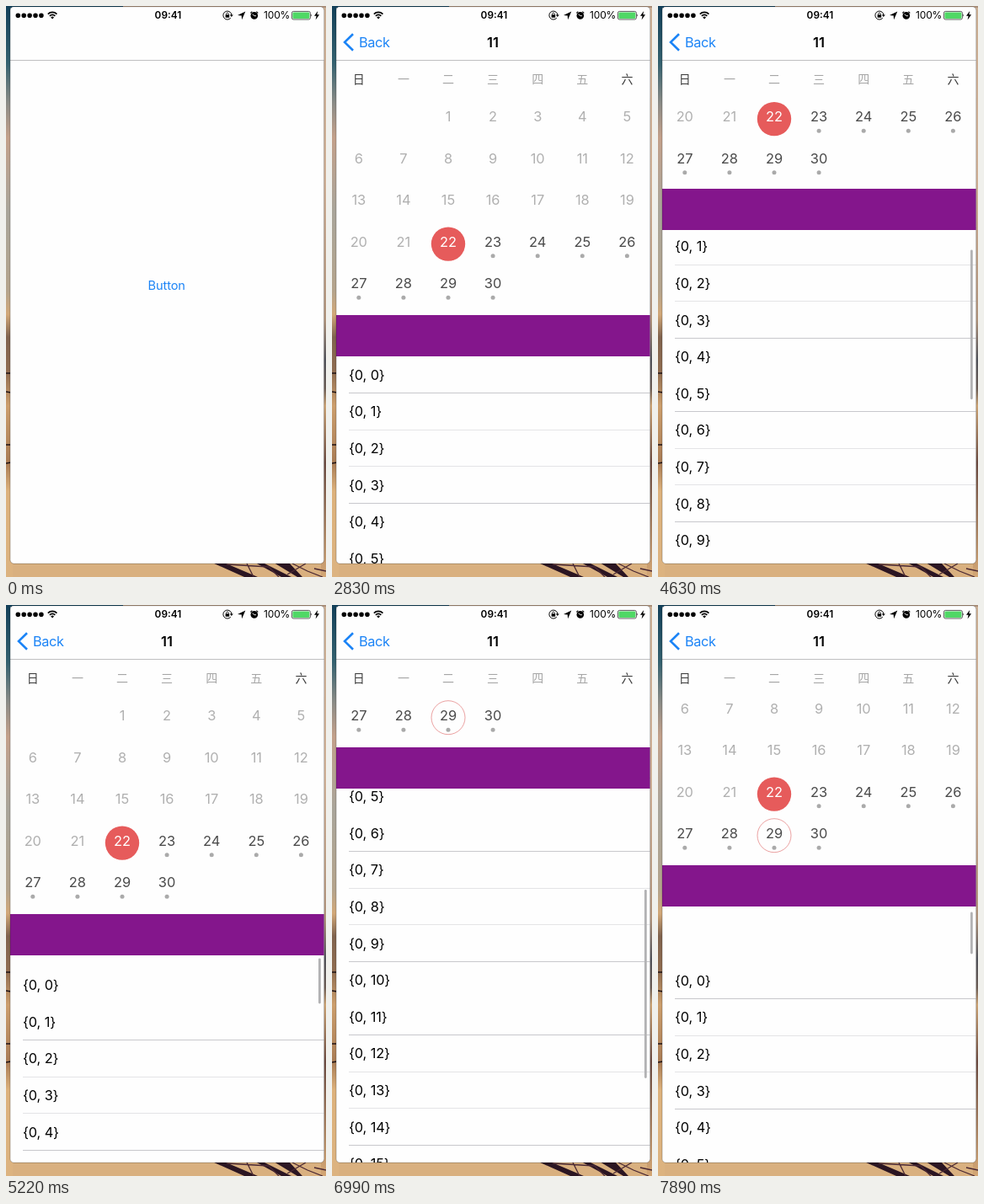
Animation of 380x678 px, one loop 8 s. Source, as an HTML page:

```html
<!DOCTYPE html>
<html lang="en">
<head>
<meta charset="utf-8">
<title>Calendar list</title>
<style>
  html, body { margin: 0; width: 100%; height: 100%; overflow: hidden; background: #d9b07f; }
  svg { display: block; width: 100vw; height: 100vh; }
  text { font-family: Inter, "Liberation Sans", sans-serif; }
  .cjk { font: 300 14px "Noto Sans CJK SC", "Noto Sans CJK", "Noto Sans CJK JP", sans-serif; }
  .mid { text-anchor: middle; }
  .day { font-size: 16.4px; }
  .cell { font-size: 16.3px; letter-spacing: -.1px; }
  .blue { fill: #1c84f6; }
</style>
</head>
<body>
<svg viewBox="0 0 380 678" xmlns="http://www.w3.org/2000/svg">
  <defs>
    <linearGradient id="sky" x2="0" y2="1">
      <stop offset="0" stop-color="#123f58"/>
      <stop offset=".1" stop-color="#34616f"/>
      <stop offset=".17" stop-color="#8a8b86"/>
      <stop offset=".23" stop-color="#c3a08a"/>
      <stop offset=".36" stop-color="#a9a59a"/>
      <stop offset=".5" stop-color="#b5a48c"/>
      <stop offset=".54" stop-color="#d2a878"/>
      <stop offset=".58" stop-color="#80634e"/>
      <stop offset=".64" stop-color="#8f6c50"/>
      <stop offset=".7" stop-color="#cc9e6c"/>
      <stop offset=".8" stop-color="#a97c55"/>
      <stop offset=".85" stop-color="#ddb27c"/>
      <stop offset="1" stop-color="#dcb380"/>
    </linearGradient>
    <linearGradient id="side" x2="0" y2="1">
      <stop offset="0" stop-color="#cbae93"/>
      <stop offset=".3" stop-color="#d0b096"/>
      <stop offset=".55" stop-color="#b0937b"/>
      <stop offset=".62" stop-color="#50525a"/>
      <stop offset=".67" stop-color="#6c5d55"/>
      <stop offset=".7" stop-color="#cda373"/>
      <stop offset=".8" stop-color="#6b4a40"/>
      <stop offset="1" stop-color="#d4a775"/>
    </linearGradient>
    <clipPath id="screen"><rect x="5" y="1" width="372.6" height="661" rx="4.5"/></clipPath>
  </defs>

  <g id="wall">
    <rect width="380" height="678" fill="#d9b07f"/>
    <rect width="8" height="678" fill="url(#sky)"/>
    <rect x="374" width="6" height="678" fill="url(#side)"/>
    <path d="M0 0H139V2H0z" fill="#123f58"/>
    <path d="M139 0H380V2H139z" fill="#a98e78"/>
    <path d="M0 436H6M0 521H6M0 458l6 1M0 543l6-1" stroke="#1d1214" stroke-width="1.6"/>
    <path d="M245 661h14l40 17h-16zM296 661h9l34 17h-12zM318 661h18l16 17h-6z" fill="#2b1522"/>
    <path d="M262 663l50 3 12 12M286 662l8 16M340 662l18 9 18 7M356 662l-22 13M366 668l14 3" fill="none" stroke="#4a2833" stroke-width="1.3"/>
  </g>

  <g clip-path="url(#screen)">
    <rect x="5" width="373" height="662" fill="#fefefe"/>
    <text id="button" class="mid blue" x="190.7" y="337" font-size="14.6" letter-spacing="-.1">Button</text>
    <rect id="dim" x="5" y="65" width="373" height="597"/>
    <g id="page">
      <rect x="5" y="65" width="373" height="597" fill="#fefefe"/>
      <g id="list"></g>
      <rect id="bar" x="371" width="2.8" rx="1.4" fill="#b2b2b4"/>
      <rect id="sheet" x="5" y="-150" width="373" height="517" fill="#fefefe"/>
      <g id="days"></g>
      <rect id="band" x="5" y="367" width="373" height="49" fill="#84168c"/>
      <rect x="5" y="60" width="373" height="49" fill="#fefefe"/>
      <g id="week"></g>
    </g>

    <rect x="5" width="373" height="64" fill="#fefefe"/>
    <rect x="5" y="64" width="373" height="1" fill="#bfbfc1"/>
    <text id="title" class="mid" y="48.6" font-size="16.4" font-weight="600">11</text>
    <g id="back">
      <path d="M25 33.3L15 43l10 9.7" fill="none" stroke="#1c84f6" stroke-width="2.6"/>
      <text class="blue" x="32" y="48.7" font-size="16.3" letter-spacing="-.35">Back</text>
    </g>

    <g id="status">
      <path d="M14.3 11.2h0M21.2 11.2h0M28.1 11.2h0M35 11.2h0M41.9 11.2h0" stroke="#000" stroke-width="5.6" stroke-linecap="round"/>
      <path d="M49.8 9.6a7.4 7.4 0 0 1 10.6 0M51.9 11.8a4.5 4.5 0 0 1 6.4 0" fill="none" stroke="#000" stroke-width="1.7"/>
      <path d="M55.1 15.4l-1.9-2a2.7 2.7 0 0 1 3.8 0z"/>
      <text class="mid" x="192.4" y="15.3" font-size="11.8" font-weight="600">09:41</text>
      <path d="M266.8 14.2a5 5 0 1 1 1.1-3.1" fill="none" stroke="#000"/>
      <path d="M265.8 10.6h4l-2 2.5zM260.6 10.3h4.6v3.5h-4.6z"/>
      <path d="M261.5 10.5v-1a1.4 1.4 0 0 1 2.8 0v1" fill="none" stroke="#000" stroke-width=".8"/>
      <path d="M284.3 6.6L275 11l4.7.5.4 4.8z"/>
      <circle cx="294.8" cy="11.4" r="4.3"/>
      <path d="M290.3 8.4l2-1.8M299.3 8.4l-2-1.8" stroke="#000" stroke-width="1.2"/>
      <path d="M292.6 9.7l2.3 2h2.2" fill="none" stroke="#fff" stroke-width=".9"/>
      <text x="306" y="15.3" font-size="12" letter-spacing="-.15">100%</text>
      <rect x="339.4" y="6.4" width="22" height="9.6" rx="2" fill="#fefefe" stroke="#333" stroke-width=".8"/>
      <rect x="340.4" y="7.4" width="20" height="7.6" rx="1.2" fill="#4fd865"/>
      <path d="M362.3 9.6q1.6 1.6 0 3.2z"/>
      <path d="M370.2 6l-4.2 5.8h2.6l-1 4.6 4.5-6.2h-2.7z"/>
    </g>
  </g>
  <rect x="5" y=".8" width="372.7" height="661.4" rx="4.5" fill="none" stroke="#000" stroke-opacity=".3" stroke-width=".8"/>
</svg>

<script>
const LOOP = 8000, TICK = 148.75, FIRST = 1926;
const ROW = 43.6, ROWS = 20, WEEK = 49.5, BOTTOM = 662;

// [tick, value] pairs
const listTop = [[8, 416], [9, 408], [10, 340], [11, 235], [12, 115], [13, 11.7], [14, -60], [15, -90],
  [16, -60], [17, 60], [18, 220], [19, 340], [20, 400], [21, 436], [22, 429.4], [23, 419], [24, 416],
  [29, 416], [30, 408], [31, 330], [32, 180], [33, 60], [34, -12.6], [35, -40], [36, -50],
  [37, 0], [38, 150], [39, 330], [40, 424]];
const fold = [[8, 0], [9, 6], [12, 115], [13, 146], [14, 198], [17, 198], [18, 150], [19, 70], [20, 15], [21, 0],
  [29, 0], [30, 6], [31, 55], [32, 120], [33, 175], [34, 198], [38, 198], [39, 130], [40, 58]];
const barFade = [[8, 0], [9, 1], [23, 1], [26, 0], [29, 0], [30, 1]];
const ring = [[24, 0], [26, 1]];

const $ = id => document.getElementById(id);
const set = (el, attrs) => { for (const k in attrs) el.setAttribute(k, attrs[k]); return el; };
const clamp = v => Math.max(0, Math.min(1, v));
const move = (id, x, y) => set($(id), { transform: `translate(${x} ${y})` });

function add(parent, tag, attrs, text) {
  const el = document.createElementNS('http://www.w3.org/2000/svg', tag);
  if (text !== undefined) el.textContent = text;
  return parent.appendChild(set(el, attrs));
}

function track(keys, k) {
  const i = keys.findIndex(key => key[0] > k);
  if (i < 0) return keys[keys.length - 1][1];
  if (i === 0) return keys[0][1];
  const [a, va] = keys[i - 1], [b, vb] = keys[i];
  return va + (vb - va) * (k - a) / (b - a);
}

const colX = c => 31.8 + 53.1 * c;

[...'日一二三四五六'].forEach((s, c) =>
  add($('week'), 'text', { class: 'cjk mid', x: colX(c), y: 92, fill: c % 6 ? '#a6a6a6' : '#3c3c3c' }, s));

let pick;
for (let d = 1; d <= 30; d++) {
  const c = (d + 1) % 7, r = Math.floor((d + 1) / 7);
  const x = colX(c), y = 131.3 + WEEK * r, days = $('days');
  if (d === 22) add(days, 'circle', { cx: x, cy: y + 2.8, r: 20.2, fill: '#e65b5b' });
  if (d === 29) pick = add(days, 'circle', { cx: x, cy: y + 2.4, r: 20, fill: 'none', stroke: '#dd6262', 'stroke-width': .6 });
  const fill = d < 22 ? '#b0b0b0' : d === 22 ? '#fff' : '#4a4a4a';
  add(days, 'text', { class: 'day mid', x, y: y + 6, fill }, d);
  if (d > 22) add(days, 'circle', { cx: x, cy: y + 17, r: 2.5, fill: '#aaa' });
}

const cells = Array.from({ length: ROWS }, (_, i) => ({
  label: add($('list'), 'text', { class: 'cell', x: 20 }, `{0, ${i}}`),
  line: add($('list'), 'rect', { x: 20, width: 358, height: 1, fill: '#c4c4c8' })
}));

function drawList(top, head) {
  cells.forEach(({ label, line }, i) => {
    const y = top + ROW * i, end = y + ROW, phase = end - Math.floor(end);
    set(label, { y: y + 27.8 });
    // hairlines fade as they fall between pixels
    set(line, { y: Math.floor(end), opacity: clamp(1.15 - 2.3 * Math.abs(phase - .5)) });
  });
  const h = BOTTOM - head, off = head - top, total = ROW * ROWS;
  const over = Math.max(0, -off);
  set($('bar'), {
    y: head + 2.5 + Math.max(0, off) / total * h + Math.min(4, over / 15),
    height: Math.max(50, h * h / total - over - 2)
  });
}

function render(t) {
  const k = Math.floor((t - FIRST) / TICK);
  const p = 1 - (1 - clamp((k - .8) / 3.2)) ** 3;
  const s = Math.round(track(fold, k));

  set($('button'), { opacity: k < 0 ? 1 : .2 + .8 * p });
  move('button', -112 * p, 0);
  set($('dim'), { opacity: p < 1 ? .1 * p : 0 });
  move('page', 373 * (1 - p), 0);
  set($('page'), { visibility: p > 0 ? 'visible' : 'hidden' });
  set($('title'), { x: 191 + 160 * (1 - p), opacity: p });
  set($('back'), { opacity: p });

  move('sheet', 0, -s);
  move('band', 0, -s);
  move('days', 0, -Math.min(s, WEEK * (k < 25 ? 3 : 4)));
  set(pick, { opacity: track(ring, k) });
  drawList(track(listTop, k), 416 - s);
  set($('bar'), { opacity: track(barFade, k) });
}

const start = performance.now();
function frame() {
  render((performance.now() - start) % LOOP);
  requestAnimationFrame(frame);
}
frame();
</script>
</body>
</html>
```
